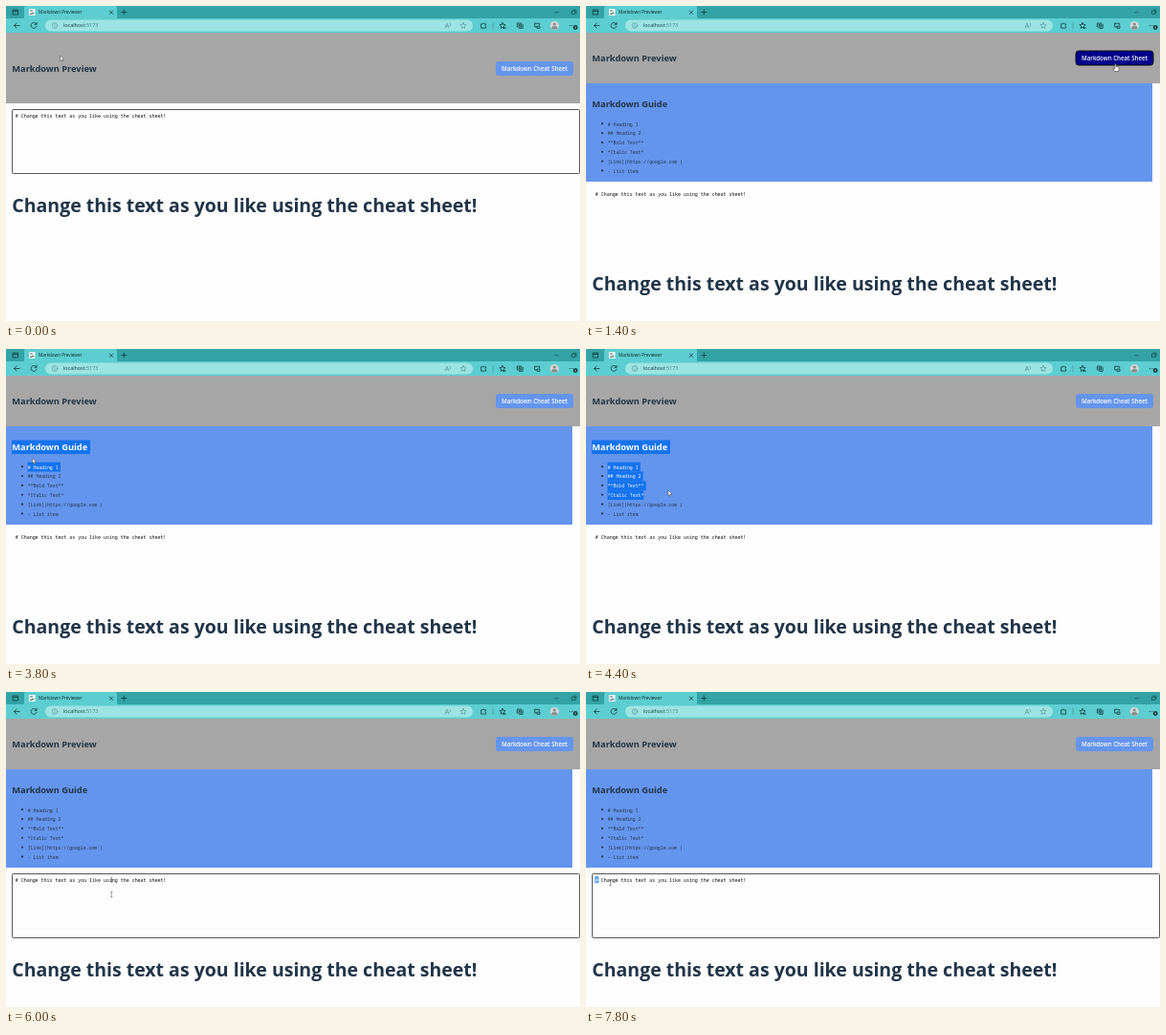
An HTML page for the animation above (8 s loop, 600 by 330 pixels).

```html
<!DOCTYPE html>
<html lang="en">
<head>
<meta charset="utf-8">
<title>Markdown Previewer</title>
<style>
  html, body { margin: 0; width: 100%; height: 100%; overflow: hidden; background: #fdfdfe; }
  svg { display: block; width: 600px; height: 330px; }
  text { font-family: "Open Sans", "Noto Sans", sans-serif; white-space: pre; }
  .bold { font-weight: 700; fill: #213547; }
  .title { font-size: 9.28px; }
  .mono { font-family: "Noto Sans Mono", "DejaVu Sans Mono", monospace; font-size: 4.96px; }
  .item { font-size: 4.84px; }
  .icon { fill: none; stroke: #123c40; stroke-width: .8; stroke-linecap: round; stroke-linejoin: round; }
</style>
</head>
<body>
<svg viewBox="0 0 600 330">
  <rect width="600" height="330" fill="#fdfdfe"/>

  <g id="browser">
    <rect width="600" height="14" fill="#33a3a6"/>
    <rect y="13" width="600" height="15" fill="#5ccdd0"/>
    <path d="M17 13.5q2 0 2-2V2q0-2 2-2h93q2 0 2 2v9.5q0 2 2 2z" fill="#5ccdd0"/>
    <rect x="41" y="14.5" width="447" height="12" rx="6" fill="#9ce4e3"/>
    <rect x="24" y="3" width="6.5" height="7" fill="#f4f7f7"/>
    <path class="icon" d="M25.5 5h2M27 7.5h2M25.5 8.5h1" stroke="#444"/>
    <text x="34" y="8.3" font-size="4.65" fill="#10282a">Markdown Previewer</text>
    <text x="60" y="22.4" font-size="5.4" fill="#12383b">localhost<tspan fill="#47797c">:5173</tspan></text>
    <g class="icon">
      <path d="M7.5 4h5v5h-5zM7.5 5.5h5"/>
      <path d="M108.3 5l3.4 3.4m0-3.4l-3.4 3.4M120.8 6.5h5M123.3 4v5"/>
      <path stroke-width=".6" d="M573.7 6.7h3.6M591.8 5.2h3.2v3.2h-3.2zM592.8 4.2h3.2v3.2"/>
      <path d="M14 20.5H8.5m2.5-2.5l-2.5 2.5L11 23"/>
      <path d="M31.8 19a3 3 0 1 0 .2 2.3M32 17.3v2h-2"/>
      <g stroke="#47797c" stroke-width=".5">
        <circle cx="51" cy="20.5" r="2.8"/>
        <path d="M51 20.2v1.8M51 19v.1M459 23l2-5 2 5m-3.3-1.7h2.6M464 18q1.5 1.2.6 3"/>
        <path d="M509 17.5v6"/>
        <path id="star" d="M478 17.4l.9 2 2.2.2-1.7 1.5.5 2.2-1.9-1.2-1.9 1.2.5-2.2-1.7-1.5 2.2-.2z"/>
      </g>
      <use href="#star" x="41"/>
      <path d="M519.5 23h3M497 18.8h1.3q.8-2 1.6 0h1.7v1.2q-1.6.6 0 1.6v1.5H497z"/>
      <path d="M534.7 18h4v4h-4zM536.5 23.3h3.7v-4M536.7 19v2m-1-1h2"/>
      <path d="M552.7 18.3h5v1.5M552.7 18.3V22h2M555.5 21h2.5v2.3h-2.5z"/>
    </g>
    <circle cx="573.3" cy="20.5" r="4.6" fill="#d3d6d6"/>
    <circle cx="573.3" cy="19" r="1.6" fill="#858c8d"/>
    <path d="M570.2 23.4q0-2.4 3.1-2.4t3.1 2.4q-3 2.4-6.2 0z" fill="#858c8d"/>
    <g fill="#123c40">
      <circle cx="589.5" cy="20.5" r=".6"/><circle cx="591.8" cy="20.5" r=".6"/>
      <circle cx="595.2" cy="22.5" r="2.4"/>
    </g>
    <path d="M595.2 21.4v2.2" stroke="#fff" stroke-width=".6"/>
  </g>

  <rect id="header" y="28" width="600" fill="#a6a6a6"/>
  <text id="brand" class="bold title" x="6.3">Markdown Preview</text>
  <g id="button">
    <rect id="buttonBox" x="512" y="0" width="81" height="15" rx="3"/>
    <text x="518" y="9.9" font-size="6.15" font-weight="600" fill="#fff">Markdown Cheat Sheet</text>
  </g>

  <g id="guide">
    <rect y="81" width="592" height="103" fill="#6495ed"/>
    <rect id="titleMark" x="6" y="95.5" width="82" height="14.5" fill="#1473f0"/>
    <text id="guideTitle" class="bold title" x="6.3" y="106.4">Markdown Guide</text>
    <g id="items"></g>
  </g>

  <g id="editor">
    <rect id="ring" x="6.5" y=".5" width="593" height="67" rx="1" fill="#fdfdfe" stroke="#222" stroke-width=".75"/>
    <rect id="hashMark" x="9.3" y="3.2" width="4" height="6.8" fill="#4b9bf5"/>
    <text class="mono" x="9.8" y="8.5" fill="#111"><tspan id="hash">#</tspan> Change this text as you like using the cheat sheet!</text>
    <path id="caret" d="M110.5 3.5v6.5" stroke="#333" stroke-width=".5"/>
  </g>
  <text id="output" class="bold" x="6.3" font-size="19.51">Change this text as you like using the cheat sheet!</text>

  <g id="cursor">
    <path id="arrow" d="M0 0v5.6l1.3-1.2.9 2 .9-.4-.9-1.9h1.8z" fill="#fff" stroke="#333" stroke-width=".45"/>
    <path id="hand" d="M-.6 0q.6-.6 1.2 0v2.5l2.6.7q.6.3.5 1l-.7 3.3H-.8L-2.6 4.8q0-.9.9-.6l1.1.7z" fill="#fff" stroke="#222" stroke-width=".5"/>
    <path id="beam" d="M-1.2-2.8h2.4M0-2.8v5.6M-1.2 2.8h2.4" fill="none" stroke="#444" stroke-width=".5"/>
  </g>
</svg>
<script>
const LOOP = 8000, STEP = 200;
const OPEN = 1400, SELECT = 3600, DESELECT = 4800, CLICK = 5600, MARK = 7200;
const ITEMS = ["# Heading 1", "## Heading 2", "**Bold Text**", "*Italic Text*",
  "[Link](https://google.com )", "- List item"];
const CHAR = 2.9;

// Pointer path: time, x, y
const PATH = [
  [0, 56.5, 52], [200, 62, 50], [600, 270, 43], [1000, 538, 57], [1200, 553.5, 61],
  [2200, 553.5, 61], [2400, 470, 72], [2800, 120, 100], [3400, 8, 103], [3600, 8, 103],
  [4400, 86, 148], [4600, 92, 156], [5000, 98, 176], [5600, 110, 199], [6000, 110.3, 212],
  [6600, 14, 199], [7000, 10, 198], [7400, 16, 198], [7800, 25.5, 200]
];

const $ = id => document.getElementById(id);
const set = (id, attrs) => {
  for (const key in attrs) $(id).setAttribute(key, attrs[key]);
};
const show = (id, on) => set(id, { display: on ? "inline" : "none" });
const shift = (id, x, y) => set(id, { transform: `translate(${x} ${y})` });

$("items").innerHTML = ITEMS.map((label, i) => {
  const y = 123.6 + i * 9.85;
  return `<circle cx="17" cy="${y - .4}" r="1.1" fill="#213547"/>
    <rect class="mark" x="22.5" y="${y - 5}" width="${label.length * CHAR + (i < 3 ? 2.5 : 0)}" height="9.9" fill="#1473f0"/>
    <text class="mono item" x="22.7" y="${y + 1.9}">${label}</text>`;
}).join("");
const marks = document.querySelectorAll(".mark");
const labels = document.querySelectorAll(".item");

function pointerAt(t) {
  const next = PATH.findIndex(p => p[0] > t);
  if (next < 0) return PATH[PATH.length - 1].slice(1);
  const [t0, x0, y0] = PATH[next - 1], [t1, x1, y1] = PATH[next];
  const k = (t - t0) / (t1 - t0);
  return [x0 + (x1 - x0) * k, y0 + (y1 - y0) * k];
}

function draw(time) {
  const t = Math.floor(time % LOOP / STEP) * STEP;
  const open = t >= OPEN;
  const buttonY = open ? 47 : 58;
  const [x, y] = pointerAt(t);

  set("header", { height: open ? 53 : 74 });
  set("brand", { y: open ? 58.3 : 69.3 });
  show("guide", open);
  shift("editor", 0, open ? 190 : 108);
  set("output", { y: open ? 297.6 : 215.6 });

  const hover = x > 512 && x < 593 && y > buttonY && y < buttonY + 15;
  shift("button", 0, buttonY);
  set("buttonBox", {
    fill: hover ? "#00008b" : "#6495ed",
    stroke: open && t < SELECT ? "#111" : "none"
  });

  const selecting = t >= SELECT && t < DESELECT;
  const rows = selecting ? Math.min(4, (t - SELECT) / STEP) : 0;
  show("titleMark", selecting);
  $("guideTitle").style.fill = selecting ? "#fff" : "";
  marks.forEach((mark, i) => mark.setAttribute("display", i < rows ? "inline" : "none"));
  labels.forEach((label, i) => label.setAttribute("fill", i < rows ? "#fff" : "#213547"));

  const marked = t >= MARK;
  show("ring", !open || t >= CLICK);
  show("caret", t >= CLICK && t < 6200);
  show("hashMark", marked);
  set("hash", { fill: marked ? "#fff" : "#111" });

  const beam = t >= 3000 && t <= SELECT || t >= 5400;
  shift("cursor", x, y);
  show("cursor", t < 2600 || t > 2800);
  show("hand", hover);
  show("beam", beam);
  show("arrow", !hover && !beam);
}

const start = performance.now();
function tick() {
  draw(performance.now() - start);
  requestAnimationFrame(tick);
}
tick();
</script>
</body>
</html>
```
